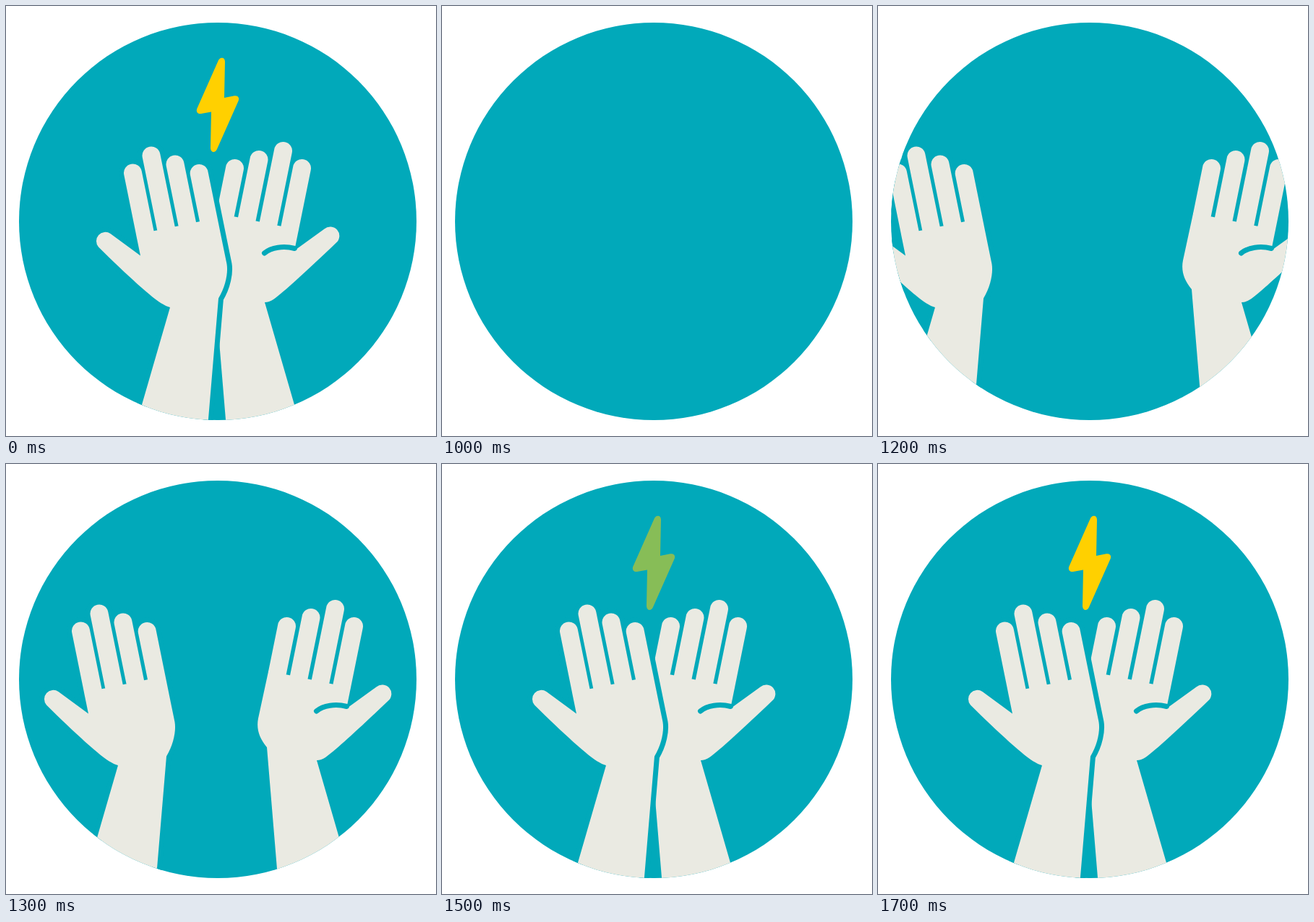
These frames come from a looping animation (595x595 px, 2800 ms). An HTML page:

```html
<!DOCTYPE html>
<html lang="en">
<head>
<meta charset="utf-8">
<title>Hands and bolt</title>
<style>
  html, body { margin: 0; width: 100%; height: 100%; overflow: hidden; background: #fff; }
  svg { display: block; width: 100vw; height: 100vh; }
  .hand { fill: #eaeae2; }
  .outlined { stroke: #01a9ba; stroke-width: 14; paint-order: stroke; }
  .crease { fill: none; stroke: #01a9ba; stroke-width: 7; stroke-linecap: round; }
</style>
</head>
<body>
<svg viewBox="0 0 595 595">
  <clipPath id="disc"><circle cx="293" cy="298" r="275"/></clipPath>
  <circle cx="293" cy="298" r="275" fill="#01a9ba"/>
  <g clip-path="url(#disc)">
    <g id="right">
      <path id="rightShape" class="hand"/>
      <path class="crease" d="M357.5 342C367 334 384 331.5 399.5 335.5"/>
    </g>
    <g id="left">
      <path id="leftShape" class="hand outlined"/>
    </g>
  </g>
  <path id="bolt" fill="#ffd000" d="M294 75C296.5 70 303 70.5 303 77L302 127L316 124.3
    C321 123.5 323.5 127 321.5 131.5L292 198C289.5 204 283 203 283 196.5L284 146.5
    L270 149C265 150 262.5 146 264.5 141.5Z"/>
</svg>
<script>
const LOOP = 2800, ENTER = 1000, STEP = 100;
const RADIUS = 12.5, LENGTH = 108, TILT = Math.atan(0.203);
const $ = id => document.getElementById(id);

// A round-tipped finger leaning left (lean 1) or right (lean -1).
function finger(x, y, lean) {
  const dx = RADIUS * Math.cos(TILT), dy = RADIUS * Math.sin(TILT) * lean;
  const run = LENGTH * Math.tan(TILT) * lean;
  return `M${x - dx + run} ${y + dy + LENGTH}L${x - dx} ${y + dy}` +
    `A${RADIUS} ${RADIUS} 0 0 1 ${x + dx} ${y - dy}l${run} ${LENGTH}Z`;
}

const hand = (palm, tips, lean) =>
  palm + tips.map(([x, y]) => finger(x, y, lean)).join("");

$("leftShape").setAttribute("d", hand(
  `M180 316.3L292.4 293.2L305.5 357C307.5 369 304 388 294 404.5L277.6 600L174 600L227 417
   Q222 416 217 412.5C204 406 166 371 128 333.5A12.5 12.5 0 0 1 144.5 315L186 345.5Z`,
  [[175.5, 231], [201, 207], [234, 219], [267.2, 231.5]], 1));

$("rightShape").setAttribute("d", hand(
  `M291.2 286.3L405 309.8L400 332L399 338.5L440.5 308.5A12.5 12.5 0 0 1 457 327.5
   C420 363 382 398 370 406Q364 410 358 410L413 600L306.3 600L289 392
   C279 380 274 367 277 352Z`,
  [[316.5, 224.5], [350, 212.5], [383.5, 200.5], [409.5, 224.5]], -1));

// Values per step after ENTER; the last one holds.
const leftShift = [-300, -224, -148, -72, 8, 0];
const rightShift = [290, 218, 145, 72, -8, 0];
const boltOpacity = [0, 0, 0, 0, 0.3, 0.53, 0.77, 1];

const valueAt = (values, step) =>
  values[step < 0 ? values.length - 1 : Math.min(step, values.length - 1)];

function render(time) {
  const step = Math.floor((time % LOOP - ENTER) / STEP);
  $("left").setAttribute("transform", `translate(${valueAt(leftShift, step)})`);
  $("right").setAttribute("transform", `translate(${valueAt(rightShift, step)})`);
  $("bolt").setAttribute("opacity", valueAt(boltOpacity, step));
}

const start = performance.now();
function tick() {
  render(performance.now() - start);
  requestAnimationFrame(tick);
}
tick();
</script>
</body>
</html>
```
